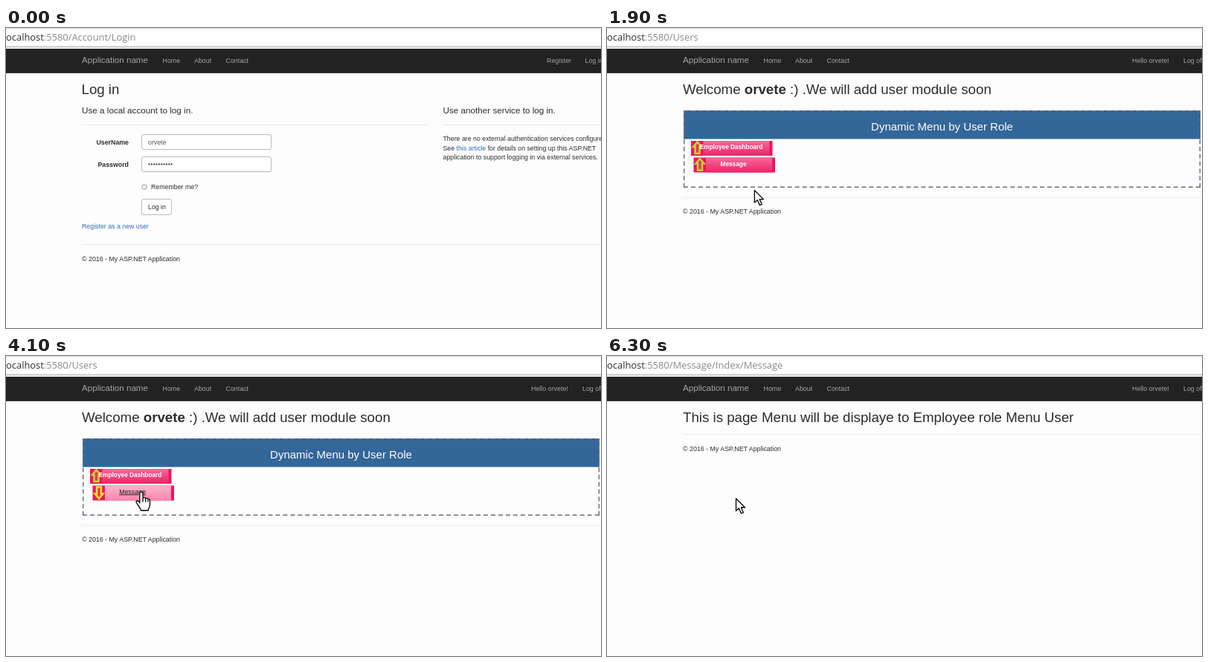
An HTML page that plays this animation: 800 by 404 pixels, repeating every 7.1 s.

```html
<!DOCTYPE html>
<html lang="en">
<head>
<meta charset="utf-8">
<title>Login and role menu</title>
<style>
  html, body { margin: 0; height: 100%; overflow: hidden; background: #fdfdfd; }
  svg { display: block; width: 800px; height: 404px; font: 8.8px Arial, "Liberation Sans", sans-serif; fill: #2c2c2c; }
  text { white-space: pre; }
  .url { font: 12.9px "Open Sans", sans-serif; }
  .nav { font-size: 8.9px; fill: #a4a4a4; }
  .brand { font-size: 11.6px; }
  .h2 { font-size: 18.7px; }
  .h4 { font-size: 11.7px; }
  .b { font-weight: bold; }
  .link { fill: #2f6cbd; }
  .rule { stroke: #ececec; }
  .box { fill: #fff; stroke: #bbb; }
  .press { fill: #e6e6e6; stroke: #adadad; }
  .dashed { fill: none; stroke: #66717d; stroke-width: 1.5; }
  .item text { fill: #fff; text-anchor: middle; font-weight: bold; font-size: 8.3px; }
  .item .face { fill: url(#pink); }
  .item .arrow { fill: #e8336f; stroke: #bfdc24; stroke-width: 2.5; }
  .item.over text { fill: #222; text-decoration: underline; font-weight: normal; font-size: 8.8px; }
  .item.over .face { fill: url(#pale); }
  .item.over .arrow { stroke: #ffe81a; transform: rotate(180deg); }
  .cursor { fill: #fff; stroke: #000; stroke-width: 1.3; stroke-linejoin: round; }
  [hidden] { display: none; }
</style>
</head>
<body>
<svg viewBox="0 0 800 404">
  <defs>
    <linearGradient id="pink" x2="0" y2="1">
      <stop stop-color="#f8699a"/><stop offset="1" stop-color="#ee2467"/>
    </linearGradient>
    <linearGradient id="pale" x2="0" y2="1">
      <stop stop-color="#fbb3cc"/><stop offset="1" stop-color="#fa86b0"/>
    </linearGradient>
    <path id="up" d="M0-8L5.5-1.5H3V7.5H-3V-1.5H-5.5Z"/>
  </defs>

  <rect width="800" height="25" fill="#fff"/>
  <path d="M0 1H800" stroke="#d4d4d4"/>
  <text class="url" x="50.8" y="17.4" text-anchor="end">localhost</text>
  <text class="url" id="path" x="50.8" y="17.4" fill="#8a8a8a"></text>
  <rect y="24.5" width="800" height="3.5" fill="#e6e6e6"/>
  <path d="M0 25H800" stroke="#bdbdbd"/>
  <rect y="28" width="800" height="32.5" fill="#222"/>
  <path d="M0 60H800" stroke="#0c0c0c"/>
  <g class="nav">
    <text class="brand" x="102" y="47">Application name</text>
    <text x="210.5" y="46.5">Home</text>
    <text x="253" y="46.5">About</text>
    <text x="295.5" y="46.5">Contact</text>
    <g id="guest"><text x="727" y="46.5">Register</text><text x="778.5" y="46.5">Log in</text></g>
    <g id="member"><text x="706" y="46.5">Hello orvete!</text><text x="775" y="46.5">Log off</text></g>
  </g>

  <g id="login">
    <text class="h2" x="101.5" y="88.5">Log in</text>
    <text class="h4" x="102" y="115">Use a local account to log in.</text>
    <text class="h4" x="587.5" y="115">Use another service to log in.</text>
    <path class="rule" d="M102 130.5H567M588 130.5H800"/>
    <text class="b" x="165" y="156.5" text-anchor="end">UserName</text>
    <text class="b" x="165" y="186.5" text-anchor="end">Password</text>
    <rect class="box" x="182.5" y="143.5" width="174" height="20" rx="2.5"/>
    <rect class="box" x="182.5" y="173.5" width="174" height="20" rx="2.5"/>
    <text x="191" y="156.5" fill="#555">orvete</text>
    <path d="M192.5 183.5H223" stroke="#444" stroke-width="2.3" stroke-linecap="round" stroke-dasharray="0 3.35"/>
    <rect x="183" y="211" width="6" height="6" rx="1" fill="#eee" stroke="#a5a5a5"/>
    <text x="195" y="217">Remember me?</text>
    <rect class="box" id="submit" x="182.5" y="230.5" width="40" height="21" rx="2.5"/>
    <text x="191" y="243.5">Log in</text>
    <text class="link" x="102" y="270">Register as a new user</text>
    <text x="587.5" y="152">There are no external authentication services configured.</text>
    <text x="587.5" y="164.5">See <tspan class="link">this article</tspan> for details on setting up this ASP.NET</text>
    <text x="587.5" y="177">application to support logging in via external services.</text>
  </g>

  <g id="users">
    <text class="h2" x="102" y="88.5">Welcome <tspan class="b">orvete</tspan> :) .We will add user module soon</text>
    <rect x="103" y="111" width="695" height="38.5" fill="#336699"/>
    <path class="dashed" stroke-dasharray="6 3.98" d="M103 111.7H798M103 214.3H798"/>
    <path class="dashed" stroke-dasharray="6 3.8" d="M103.7 111V215M797.3 111V215"/>
    <text x="450.5" y="138" text-anchor="middle" font-size="15" style="fill:#fff">Dynamic Menu by User Role</text>
    <g class="item" id="dash" transform="translate(113 152)"></g>
    <g class="item" id="msg" transform="translate(116.5 174.5)"></g>
  </g>

  <text class="h2" id="done" x="102" y="88.5">This is page Menu will be displaye to Employee role Menu User</text>

  <g id="foot">
    <path class="rule" d="M102 .5H800"/>
    <text x="102" y="22.5" font-size="8.85">© 2016 - My ASP.NET Application</text>
  </g>

  <path class="cursor" id="arrow" d="M0 0V16.5L3.8 13L7 20L9.8 18.8L6.8 12H12Z"/>
  <g class="cursor" id="hand">
    <path d="M-2.2 14V1a2.1 2.1 0 0 1 4.2 0V7.5a2 2 0 0 1 3.6 .6a2 2 0 0 1 3.3 .8A1.7 1.7 0 0 1 11.5 10.5v6c0 3-2 4-2.2 7.5H-.5C-1 20.5-4 18.5-6.8 13.2c-1-2.5 2-3.5 4.6 .3z"/>
    <path d="M2 7.5v5M5.6 8.5v4M8.9 9.5v3" fill="none"/>
  </g>
</svg>
<script>
const LOOP = 7100, STEP = 100;
const $ = id => document.getElementById(id);
const show = (id, on) => $(id).toggleAttribute('hidden', !on);

// time, x, y of the pointer tip
const track = [
  [300, 226, 192], [700, 203.5, 225], [900, 205, 237], [1300, 205.5, 243],
  [1600, 205.5, 243], [2400, 186.5, 178], [2500, 186.5, 177], [3200, 192.8, 164.5],
  [3500, 192.8, 164.5], [4100, 182, 184], [4300, 182, 184], [4800, 180, 184],
  [5000, 180, 184], [5300, 179, 182], [6100, 179, 182], [6300, 173.5, 192]
];

for (const [id, mid] of [['dash', 54], ['msg', 53.5]]) {
  $(id).innerHTML = `<rect width="109.5" height="20" fill="#ee155f"/>
    <rect class="face" x="16.5" width="89" height="20"/>
    <g transform="translate(8.5 9.5)"><use href="#up" class="arrow"/></g>
    <text x="${mid}" y="11"></text>`;
}
const label = (id, text) => { $(id).querySelector('text').textContent = text; };

function pointer(t) {
  const i = track.findIndex(k => k[0] > t);
  if (i < 0) return track[track.length - 1].slice(1);
  const [t0, x0, y0] = track[Math.max(i - 1, 0)], [t1, x1, y1] = track[i];
  const p = Math.max(0, (t - t0) / (t1 - t0));
  return [x0 + (x1 - x0) * p, y0 + (y1 - y0) * p];
}

function draw(t) {
  const page = t < 1200 ? 'login' : t < 4900 ? 'users' : 'done';
  const loaded = t >= 1500;
  const [x, y] = pointer(t);
  const inLogin = page === 'login', inUsers = page === 'users';

  for (const id of ['login', 'users', 'done']) show(id, id === page);
  show('guest', inLogin);
  show('member', !inLogin);
  $('path').textContent = ':5580/' +
    (t < 1100 ? 'Account/Login' : t < 4600 ? 'Users' : 'Message/Index/Message');

  show('foot', !inUsers || loaded);
  $('foot').setAttribute('transform', `translate(0 ${inLogin ? 291 : inUsers ? 227.5 : 105})`);

  const press = inLogin && t >= 800;
  $('submit').classList.toggle('press', press);

  const overMsg = inUsers && loaded && y >= 174 && y < 195;
  const overDash = inUsers && loaded && y < 174;
  show('msg', loaded);
  label('dash', loaded ? 'Employee Dashboard' : '{{menus.MenuName)}}');
  label('msg', 'Message');
  $('dash').classList.toggle('over', overDash);
  $('msg').classList.toggle('over', overMsg);

  const hand = press || ((overMsg || overDash) && t < 4600);
  const seen = t >= track[0][0];
  show('hand', seen && hand);
  show('arrow', seen && !hand);
  for (const id of ['hand', 'arrow']) $(id).setAttribute('transform', `translate(${x} ${y})`);
}

let last = -1;
const start = performance.now();
function tick(now) {
  const t = Math.floor((Math.max(0, now - start) % LOOP) / STEP) * STEP;
  if (t !== last) draw(last = t);
  requestAnimationFrame(tick);
}
tick(start);
</script>
</body>
</html>
```
